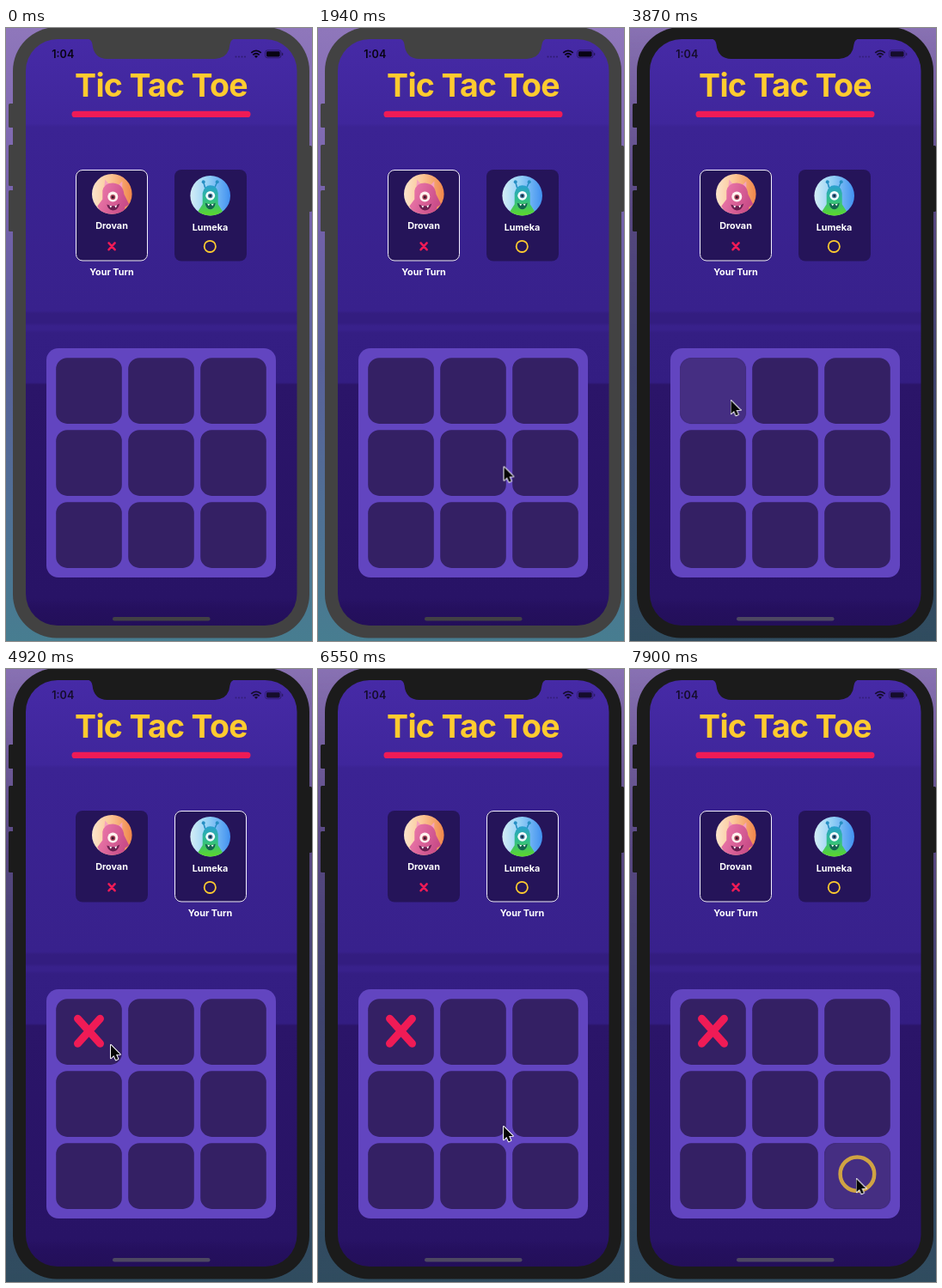
Write an HTML page that moves like this. It is 356 by 714 pixels and loops after 8 s.

```html
<!DOCTYPE html>
<html lang="en">
<head>
<meta charset="utf-8">
<title>Tic Tac Toe</title>
<style>
  html, body { margin: 0; width: 100%; height: 100%; overflow: hidden; background: #5f5a98; }
  svg { display: block; width: 100%; height: 100%; }
  text { font-family: Inter, "Liberation Sans", sans-serif; font-weight: 700; text-anchor: middle; }

  .title { font-size: 37.5px; letter-spacing: -.7px; fill: #ffcb2f; }
  .label { font-size: 10.8px; fill: #fff; }
  .clock { font-size: 12.6px; font-weight: 600; }
  .card { fill: #251459; }
  .red { fill: none; stroke: #f01b56; stroke-linecap: round; }
  .gold { fill: none; stroke: #ffcb2f; }
  .press { fill: #452e82; }

  /* Every state switches hard, on one shared 8 s clock. */
  .bezel, .shade, .status, .home, .turn, .press, .mark, .cursor {
    animation: 8s step-end infinite;
  }
  .bezel { animation-name: bezel; }
  .shade { animation-name: shade; }
  .status { animation-name: status; }
  .home { animation-name: home; }
  .turn.one { animation-name: turn-one; }
  .turn.two { animation-name: turn-two; }
  .press.first { animation-name: press-first; }
  .press.last { animation-name: press-last; }
  .mark.cross { animation-name: cross; }
  .mark.ring { animation-name: ring; }
  .cursor { animation-name: cursor; }

  @keyframes bezel { 0% { fill: #424242 } 48.375%, 100% { fill: #1b1b1b } }
  @keyframes shade { 0% { opacity: 0 } 48.375%, 100% { opacity: 1 } }
  @keyframes status { 0% { color: #080413 } 48.375%, 100% { color: #150d2c } }
  @keyframes home { 0% { fill: #424145 } 48.375%, 100% { fill: #4d4862 } }
  @keyframes turn-one { 0% { opacity: 1 } 50.25% { opacity: 0 } 98.75%, 100% { opacity: 1 } }
  @keyframes turn-two { 0% { opacity: 0 } 50.25% { opacity: 1 } 98.75%, 100% { opacity: 0 } }
  @keyframes press-first { 0% { opacity: 0 } 48.375% { opacity: 1 } 52.125%, 100% { opacity: 0 } }
  @keyframes press-last { 0% { opacity: 0 } 95%, 100% { opacity: 1 } }
  @keyframes cross { 0% { opacity: 0 } 50.25% { opacity: .75 } 52.125%, 100% { opacity: 1 } }
  @keyframes ring { 0% { opacity: 0 } 98.75%, 100% { opacity: .75 } }

  @keyframes cursor {
    0% { opacity: 0; transform: translate(321px, 634px) }
    /* into the board */
    16.875% { opacity: 1; transform: translate(321px, 634px) }
    18.75% { transform: translate(279px, 605px) }
    20.5% { transform: translate(238px, 556px) }
    22.375% { transform: translate(222px, 521px) }
    24.25% { transform: translate(216.5px, 511.5px) }
    /* to the first cell */
    29.875% { transform: translate(212px, 509px) }
    31.75% { transform: translate(196px, 498px) }
    33.5% { transform: translate(174px, 480px) }
    35.375% { transform: translate(150px, 461px) }
    37.25% { transform: translate(131px, 445px) }
    39% { transform: translate(120px, 436px) }
    40.875% { transform: translate(117.5px, 434px) }
    /* to the centre cell */
    61.5% { transform: translate(122px, 438px) }
    63.375% { transform: translate(141px, 456px) }
    65.125% { transform: translate(168px, 484px) }
    67% { transform: translate(190px, 505px) }
    68.75% { transform: translate(200px, 514px) }
    70.625% { transform: translate(202.5px, 516.5px) }
    /* to the last cell */
    80% { transform: translate(206px, 521px) }
    81.875% { transform: translate(216px, 533px) }
    83.75% { transform: translate(230px, 551px) }
    85.625% { transform: translate(244px, 570px) }
    87.5% { transform: translate(255px, 584px) }
    89.375% { transform: translate(261px, 592px) }
    91.25%, 100% { opacity: 1; transform: translate(263.5px, 594px) }
  }
</style>
</head>
<body>
<svg viewBox="0 0 356 714" xmlns="http://www.w3.org/2000/svg">
  <defs>
    <linearGradient id="desk" x2="0" y2="1">
      <stop offset="0" stop-color="#8f77bb"/>
      <stop offset=".3" stop-color="#7561ab"/>
      <stop offset=".55" stop-color="#59619a"/>
      <stop offset="1" stop-color="#477d90"/>
    </linearGradient>
    <linearGradient id="shadow" x2="0" y2="1">
      <stop offset="0" stop-color="#10091c" stop-opacity=".05"/>
      <stop offset=".3" stop-color="#10091c" stop-opacity=".3"/>
      <stop offset="1" stop-color="#10091c" stop-opacity=".42"/>
    </linearGradient>
    <linearGradient id="wall" gradientUnits="userSpaceOnUse" x1="0" y1="0" x2="0" y2="714">
      <stop offset=".018" stop-color="#462aa6"/>
      <stop offset=".156" stop-color="#3f269b"/>
      <stop offset=".161" stop-color="#3b2393"/>
      <stop offset=".461" stop-color="#38218c"/>
      <stop offset=".466" stop-color="#331d80"/>
      <stop offset=".481" stop-color="#331d80"/>
      <stop offset=".486" stop-color="#38218b"/>
      <stop offset=".492" stop-color="#38218b"/>
      <stop offset=".497" stop-color="#341e83"/>
      <stop offset=".578" stop-color="#331d82"/>
      <stop offset=".582" stop-color="#2b1569"/>
      <stop offset=".93" stop-color="#281366"/>
      <stop offset=".945" stop-color="#25105f"/>
      <stop offset=".975" stop-color="#230f59"/>
    </linearGradient>
    <linearGradient id="peach">
      <stop offset="0" stop-color="#fce6cf"/>
      <stop offset=".45" stop-color="#fbc797"/>
      <stop offset="1" stop-color="#f08448"/>
    </linearGradient>
    <linearGradient id="sky">
      <stop offset="0" stop-color="#d6eff6"/>
      <stop offset=".45" stop-color="#94d0f6"/>
      <stop offset="1" stop-color="#3f8ff0"/>
    </linearGradient>
    <linearGradient id="pink" x2="1" y2=".4">
      <stop offset="0" stop-color="#f07fae"/>
      <stop offset="1" stop-color="#c94c88"/>
    </linearGradient>
    <linearGradient id="lime" x2="0" y2="1">
      <stop offset="0" stop-color="#2a9fd0"/>
      <stop offset=".45" stop-color="#2fbd8c"/>
      <stop offset="1" stop-color="#5fd825"/>
    </linearGradient>
    <clipPath id="round"><circle r="23.3"/></clipPath>
    <rect id="tile" width="76.6" height="76.6" rx="13"/>
    <rect id="panel" width="84" height="106.5" rx="8"/>
    <rect id="outline" x=".5" y=".5" width="83" height="105.5" rx="7.5" fill="none" stroke="#f4f0ff"/>
  </defs>

  <!-- desktop and phone -->
  <rect width="356" height="714" fill="url(#desk)"/>
  <rect class="shade" width="356" height="714" fill="url(#shadow)"/>
  <g class="bezel">
    <rect x="3" y="88" width="8" height="28" rx="1.5"/>
    <rect x="3" y="136" width="8" height="48" rx="1.5"/>
    <rect x="3" y="189" width="8" height="48" rx="1.5"/>
    <rect x="348" y="137" width="8" height="77" rx="1.5"/>
    <rect x="8" y="-1" width="345" height="711.5" rx="51"/>
  </g>
  <rect x="23" y="13" width="315.5" height="683" rx="37" fill="url(#wall)"/>
  <path class="bezel" d="M93 12Q100 13 100.5 19Q102 35.5 118 36H243Q259 35.5 260.5 19Q261 13 268 12Z"/>
  <rect class="home" x="124" y="686" width="113.5" height="4.6" rx="2.3"/>

  <!-- status bar -->
  <g class="status" fill="currentColor">
    <text class="clock" x="66.3" y="35">1:04</text>
    <g opacity=".35">
      <circle cx="267.5" cy="33.5" r="1"/><circle cx="271" cy="33.5" r="1"/>
      <circle cx="274.5" cy="33.5" r="1"/><circle cx="278" cy="33.5" r="1"/>
    </g>
    <g fill="none" stroke="currentColor" stroke-width="1.8">
      <path d="M285.3 28.9Q291 23.8 296.7 28.9"/>
      <path d="M287.3 31.4Q291 28.2 294.7 31.4"/>
    </g>
    <path d="M288.9 32.8Q291 31.2 293.1 32.8L291 35Z"/>
    <rect x="301.6" y="25.9" width="18.4" height="8.9" rx="2.6" fill="none" stroke="currentColor" stroke-opacity=".45" stroke-width=".9"/>
    <rect x="303" y="27.3" width="15.6" height="6.1" rx="1.4"/>
    <rect x="321" y="28.8" width="1.3" height="3.2" rx=".6" opacity=".5"/>
  </g>

  <text class="title" x="180.5" y="80.3">Tic Tac Toe</text>
  <rect x="76.5" y="96.8" width="208" height="7.2" rx="3.6" fill="#ef1b56"/>

  <!-- first player -->
  <g transform="translate(81 165)">
    <use href="#panel" class="card"/>
    <g transform="translate(42.3 28.4)" clip-path="url(#round)">
      <rect x="-24" y="-24" width="48" height="48" fill="url(#peach)"/>
      <path d="M-9-9L-8-17L-3-11ZM7-10L12-15L12-6Z" fill="#f6a3bd"/>
      <path d="M-11 24L-17 14L-11 6V-4Q-9-13 1-13Q13-12 14 0L20 12L15 15V24Z" fill="url(#pink)"/>
      <circle cx="1" cy="3" r="6" fill="#fff1ee"/>
      <circle cx="1" cy="3.5" r="3" fill="#a9445a"/>
      <circle cx="1" cy="3.5" r="1.5" fill="#35142c"/>
      <path d="M-6 12Q2 16 9 11Q7 19 1 19Q-5 18-6 12Z" fill="#6b1f50"/>
      <path d="M-3 13.4L-1.5 16L0 14ZM3 13.8L4.5 16L6 12.8Z" fill="#fff"/>
    </g>
    <text class="label" x="42" y="68.8">Drovan</text>
    <path class="red" stroke-width="2.5" d="M38.6 85.4L45.6 93.2M45.6 85.4L38.6 93.2"/>
    <g class="turn one">
      <use href="#outline"/>
      <text class="label" x="42" y="122.7">Your Turn</text>
    </g>
  </g>

  <!-- second player -->
  <g transform="translate(196 165)">
    <use href="#panel" class="card"/>
    <g transform="translate(41.7 30.3)" clip-path="url(#round)">
      <rect x="-24" y="-24" width="48" height="48" fill="url(#sky)"/>
      <path d="M-6-9L-8-16M5-9L8-16" stroke="#278fc4" stroke-width="1.6"/>
      <circle cx="-8" cy="-16" r="2" fill="#278fc4"/>
      <circle cx="8" cy="-16" r="2" fill="#278fc4"/>
      <path d="M-10 24L-16 21L-9 10V-3Q-7-12 0-12Q8-12 9-3V10L16 21L10 24Z" fill="url(#lime)"/>
      <circle cx="0" cy="0" r="5.4" fill="#f3fbff"/>
      <circle cx="0" cy=".2" r="2.8" fill="#4b7fa2"/>
      <circle cx="0" cy=".2" r="1.4" fill="#142a3c"/>
      <path d="M-6 8.5Q0 11 6 8.5Q5 16 0 16Q-5 16-6 8.5Z" fill="#12634f"/>
      <path d="M-3.5 9.5L-2 12L-.5 10ZM1 10L2.5 12L4 9.4Z" fill="#fff"/>
    </g>
    <text class="label" x="41.5" y="70.8">Lumeka</text>
    <circle class="gold" cx="41.3" cy="89.4" r="6.6" stroke-width="1.8"/>
    <g class="turn two">
      <use href="#outline"/>
      <text class="label" x="41.5" y="122.7">Your Turn</text>
    </g>
  </g>

  <!-- board -->
  <rect x="47" y="373" width="267" height="267" rx="14" fill="#6245c0"/>
  <g id="cells" fill="#342064"></g>
  <use href="#tile" class="press first" x="58.2" y="384.3"/>
  <use href="#tile" class="press last" x="226.2" y="552.3"/>
  <path class="red mark cross" stroke-width="9" d="M83.5 407.3L109.5 436.3M109.5 407.3L83.5 436.3"/>
  <circle class="gold mark ring" cx="264.4" cy="588.2" r="19.8" stroke-width="4.5"/>

  <path class="cursor" d="M0 0V15.2L3.5 12L5.8 17.3L8.4 16.2L6.1 10.9H10.8Z"
        fill="#050505" stroke="#fff" stroke-width="1.9" stroke-linejoin="round" paint-order="stroke"/>
</svg>
<script>
  const cells = document.getElementById("cells");
  for (let i = 0; i < 9; i++) {
    const cell = document.createElementNS(cells.namespaceURI, "use");
    cell.setAttribute("href", "#tile");
    cell.setAttribute("x", 58.2 + 84 * (i % 3));
    cell.setAttribute("y", 384.3 + 84 * Math.floor(i / 3));
    cells.append(cell);
  }
</script>
</body>
</html>
```
